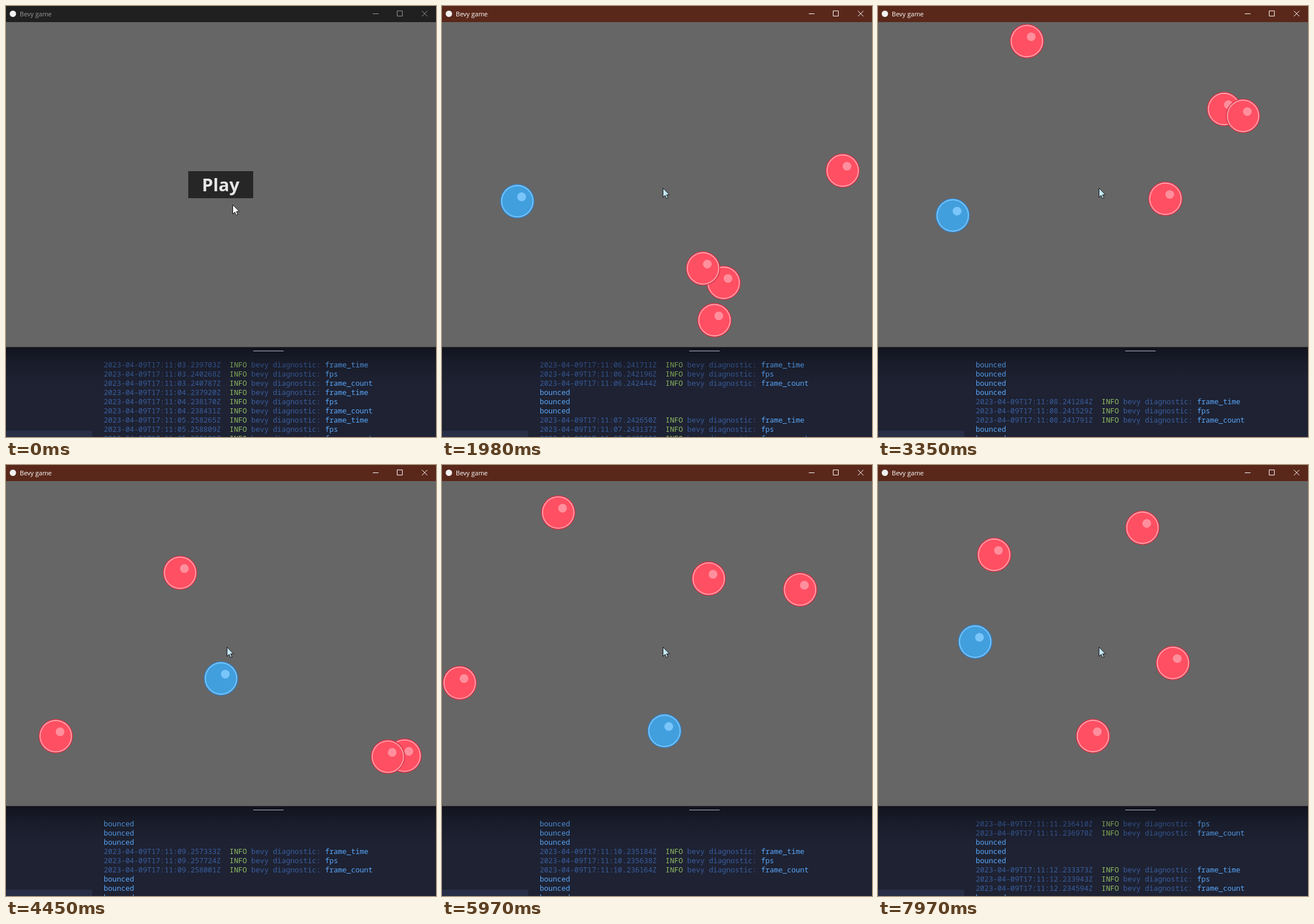
These frames come from a looping animation (748x749 px, 8 s). An HTML page:

```html
<!DOCTYPE html>
<html lang="en">
<head>
<meta charset="utf-8">
<title>Bevy game</title>
<style>
  html, body { margin: 0; width: 100%; height: 100%; overflow: hidden; background: #1e2233; }
  svg { display: block; }
  .log text { font: 12.58px "Noto Sans Mono", monospace; white-space: pre; fill: #5aa8fb; }
  .log .dim { fill: #3a5fa0; }
  .log .info { fill: #93c062; }
  .title { font: 11px "Open Sans", sans-serif; }
  .play { font: 700 31px "Noto Sans", sans-serif; fill: #e6e6e6; }
</style>
</head>
<body>
<svg width="748" height="749" viewBox="0 0 748 749">
  <defs>
    <linearGradient id="shade" x1="0" y1="0" x2="0" y2="1">
      <stop offset="0" stop-color="#000" stop-opacity=".42"/>
      <stop offset=".4" stop-color="#000" stop-opacity=".17"/>
      <stop offset="1" stop-color="#000" stop-opacity="0"/>
    </linearGradient>
    <g id="red">
      <circle r="29.8" fill="#d22f42"/>
      <circle r="28.4" fill="#ff9aa6"/>
      <circle r="26.3" fill="#ff4f62"/>
      <circle cx="7.5" cy="-7.5" r="7.6" fill="#ff8f9d"/>
    </g>
    <g id="blue">
      <circle r="29.8" fill="#2f80c6"/>
      <circle r="28.4" fill="#74c2fa"/>
      <circle r="26.3" fill="#429fdd"/>
      <circle cx="7.5" cy="-7.5" r="7.6" fill="#7ac6fb"/>
    </g>
    <clipPath id="arena"><rect y="28" width="748" height="565"/></clipPath>
  </defs>

  <rect width="748" height="749" fill="#1e2233"/>
  <rect y="738" width="150" height="11" fill="#292e47"/>
  <g id="log" class="log"></g>
  <rect y="593" width="748" height="70" fill="url(#shade)"/>
  <rect x="430" y="599" width="53" height="1" fill="#b4bac6"/>

  <rect y="20" width="748" height="573" rx="3" fill="#666"/>
  <rect y="592" width="748" height="1" fill="#4f4c4b"/>
  <rect id="bar" width="748" height="28"/>
  <g id="chrome">
    <circle cx="12" cy="13.5" r="5.5" fill="#f2f2f2"/>
    <text class="title" x="24" y="18" fill="currentColor">Bevy game</text>
    <path d="M638 13.5h10M680.5 8.5h9v9h-9zM723.5 8.5l9.5 9.5M733 8.5l-9.5 9.5"
          fill="none" stroke="currentColor"/>
  </g>

  <g id="menu">
    <rect id="button" x="317" y="287" width="113" height="47"/>
    <text class="play" x="373.5" y="322" text-anchor="middle">Play</text>
  </g>
  <g id="game" clip-path="url(#arena)"></g>
  <path id="cursor" d="M.5 .5v16l3.6-3.4 2.5 5.4 2.6-1.1-2.5-5.3h5z" stroke="#111"/>
</svg>

<script>
const LOOP = 8000, START = 700;
const $ = id => document.getElementById(id);

// Screen updates come in twelve even steps between these times.
const STEPS = [70, 890, 1700, 2530, 3350, 4160, 5000, 5840, 6660, 7480, 8320];

// Enemy paths with the wall reflections unrolled; fold() brings them back inside.
const TIMES = [1980, 3350, 4450, 5970, 7000, 7970];
const ENEMIES = [
  { x: [697, 936, 1135, 1405, 1583, 1754], y: [286, 791, 1201, 1757, 2134, 2491] },
  { x: [474, 259, 85, -146, -307, -457], y: [546, 1065, 1485, 2053, 2443, 2802] },
  { x: [490, 602, 694, 813, 897, 976], y: [481, -63, -509, -1110, -1523, -1911] },
  { x: [454, 635, 773, 972, 1107, 1234], y: [456, -75, -507, -1091, -1490, -1864] }
];

const PLAYER = {
  t: [1180, 1310, 1790, 1915, 2350, 2590, 3000, 3240, 3620, 4110, 4700, 4890, 6050, 6360, 6980, 7070, 7360],
  x: [374, 374, 131, 131, 131, 250, 250, 130, 130, 374, 374, 387, 387, 310, 27, 27, 169],
  y: [310, 375, 375, 371, 158, 158, 364, 364, 364, 371, 371, 462, 462, 307, 307, 307, 307]
};
const CURSOR = { t: [110, 480], x: [394, 384], y: [345, 316] };

const REPORTS = [
  [-3, "03", 239703, 240268, 240787], [-2, "04", 237920, 238170, 238431],
  [-1, "05", 258265, 258809, 259181], [950, "06", 241711, 242196, 242444],
  [1940, "07", 242650, 243137, 243568], [2950, "08", 241284, 241529, 241791],
  [4020, "09", 257333, 257724, 258001], [4980, "10", 235184, 235638, 236164],
  [6060, "11", 235898, 236410, 236970], [7060, "12", 233373, 233943, 234594]
];
const BOUNCES = [1360, 1700, 1770, 2025, 2025, 2100, 2737, 3006, 3050, 3360, 3980, 4100, 4297,
  4305, 4680, 4740, 4790, 5460, 5570, 5600, 5975, 6030, 6840, 6840, 6916, 7370];
const FIELDS = ["frame_time", "fps", "frame_count"];

const LINES = [
  ...REPORTS.flatMap(([t, sec, ...micros]) => micros.map((us, i) => ({
    t,
    html: `<tspan class="dim">2023-04-09T17:11:${sec}.${us}Z</tspan>  <tspan class="info">INFO</tspan>` +
      ` <tspan class="dim">bevy diagnostic:</tspan> ${FIELDS[i]}`
  }))),
  ...BOUNCES.map(t => ({ t, html: "bounced" }))
].sort((a, b) => a.t - b.t);

function snap(t) {
  if (t < STEPS[0]) return 0;
  const i = STEPS.findLastIndex(s => s <= t);
  const step = (STEPS[i + 1] - STEPS[i]) / 12;
  const time = STEPS[i] + Math.floor((t - STEPS[i] + 8) / step) * step;
  return Math.min(t, Math.round(time / 10) * 10);
}

function lerp(times, values, t) {
  let i = 0;
  while (i < times.length - 2 && t >= times[i + 1]) i++;
  const k = (t - times[i]) / (times[i + 1] - times[i]);
  return values[i] + (values[i + 1] - values[i]) * k;
}

function fold(u, lo, hi) {
  const span = hi - lo, m = (((u - lo) % (2 * span)) + 2 * span) % (2 * span);
  return lo + (m > span ? 2 * span - m : m);
}

function place(el, x, y) {
  el.setAttribute("transform", `translate(${x.toFixed(1)} ${y.toFixed(1)})`);
}

function follow(el, path, t) {
  const time = Math.max(path.t[0], Math.min(path.t.at(-1), t));
  place(el, lerp(path.t, path.x, time), lerp(path.t, path.y, time));
}

function addBall(kind) {
  const use = document.createElementNS("http://www.w3.org/2000/svg", "use");
  use.setAttribute("href", "#" + kind);
  return $("game").appendChild(use);
}

const player = addBall("blue");
const enemies = ENEMIES.map(() => addBall("red"));
let shownLines = -1;

function drawLog(t) {
  const count = LINES.filter(line => line.t <= t).length;
  if (count === shownLines) return;
  shownLines = count;
  $("log").innerHTML = LINES.slice(count - 9, count)
    .map((line, i) => `<text x="170" y="${628 + 16 * i}">${line.html}</text>`).join("");
}

function render(t) {
  const playing = t >= START;
  $("bar").setAttribute("fill", playing ? "#5a281b" : "#202020");
  $("chrome").style.color = playing ? "#fff" : "#999";
  $("menu").style.display = playing ? "none" : "";
  $("game").style.display = playing ? "" : "none";
  $("button").setAttribute("fill", t > 270 ? "#404040" : "#262626");
  $("cursor").setAttribute("fill", playing ? "#c4e6f5" : "#fff");
  follow($("cursor"), CURSOR, t);
  follow(player, PLAYER, t);
  ENEMIES.forEach((path, i) => place(enemies[i],
    fold(lerp(TIMES, path.x, t), 28, 718),
    fold(lerp(TIMES, path.y, t), 58, 563)));
  drawLog(t);
}

const origin = performance.now();
function tick() {
  render(snap((performance.now() - origin) % LOOP));
  requestAnimationFrame(tick);
}
tick();
</script>
</body>
</html>
```
